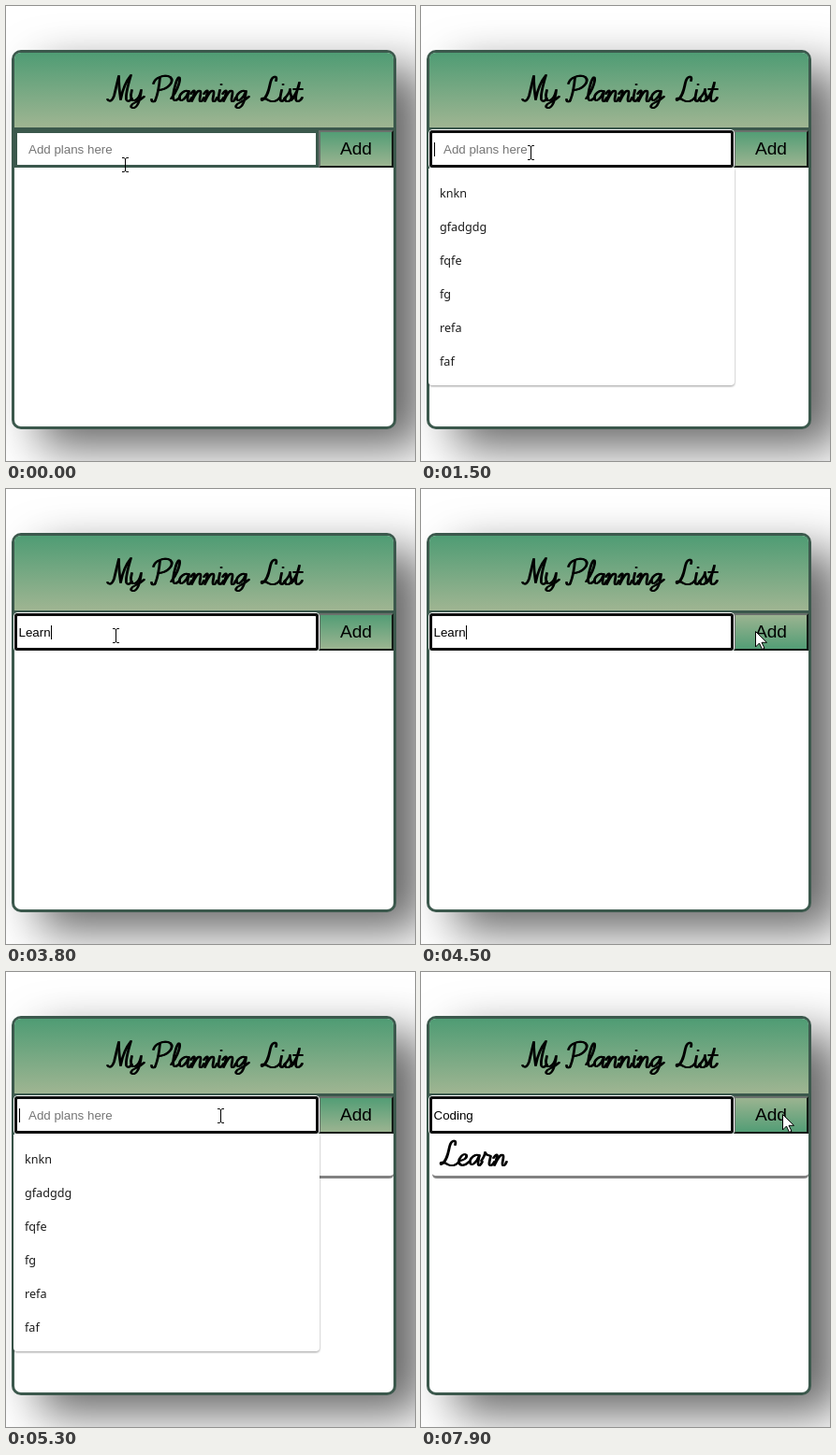
These frames come from a looping animation (437 by 487 pixels, 8 s). An HTML page:

```html
<!DOCTYPE html>
<html lang="en">
<head>
<meta charset="utf-8">
<title>Planning list</title>
<style>
html, body { margin: 0; width: 100%; height: 100%; overflow: hidden; background: #fff; }
.card {
  position: absolute; left: 6px; top: 47px; width: 411px; height: 406px;
  box-sizing: border-box; border: 3px solid #3b584c; border-radius: 10px;
  background: #fff; box-shadow: 30px 20px 50px rgba(0, 0, 0, .6);
}
svg { position: absolute; left: 0; top: 0; }
text { font: 13.333px "Liberation Sans", Arial, sans-serif; white-space: pre; }
#add { font-size: 19.2px; }
#menu text { font: 12.6px "Noto Sans", "Open Sans", sans-serif; fill: #1c1c1c; }
#menu > path { filter: drop-shadow(0 1px 1px rgba(0, 0, 0, .4)); }
.script { fill: none; stroke: #000; stroke-width: 1.8; stroke-linecap: round; stroke-linejoin: round; }
.ring { fill: none; stroke: #101010; }
.halo { fill: none; stroke: #fff; }
</style>
</head>
<body>
<div class="card"></div>
<svg width="437" height="487" viewBox="0 0 437 487">
  <defs>
    <linearGradient id="down" x2="0" y2="1">
      <stop stop-color="#4f9c74"/><stop offset="1" stop-color="#9fb592"/>
    </linearGradient>
    <linearGradient id="up" x2="0" y2="1">
      <stop stop-color="#9fb592"/><stop offset="1" stop-color="#4f9c74"/>
    </linearGradient>
  </defs>

  <path fill="url(#down)" d="M9 130V57q0-7 7-7H407q7 0 7 7V130z"/>
  <path fill="#3b584c" d="M9 130H414v3H9z"/>
  <g id="title" class="script" role="img" aria-label="My Planning List"></g>

  <g id="item">
    <g id="plan" class="script" role="img" aria-label="Learn"></g>
    <path fill="#828282" d="M12 216q1 2 5 2H409q4 0 5-2v1q0 4-5 4H17q-5 0-5-5z"/>
  </g>

  <rect x="10.5" y="134.5" width="322" height="37" fill="#fff" stroke="#3b584c" stroke-width="3"/>
  <rect id="button" x="334" y="133" width="80" height="40"/>
  <path fill="#6a706c" d="M334 173V133H414l-2 2H336V171z"/>
  <path fill="#141a16" d="M414 133V173H334l2-2H412V135z"/>
  <text id="add" x="356.9" y="159">Add</text>

  <g id="inputFocus">
    <rect class="halo" x="8.5" y="132.5" width="326" height="41" rx="3.5"/>
    <rect class="ring" x="10.5" y="134.5" width="322" height="37" rx="2" stroke-width="3"/>
  </g>
  <g id="buttonFocus">
    <rect class="halo" x="333.5" y="132.5" width="81" height="41" rx="3.5"/>
    <rect class="ring" x="335" y="134" width="78" height="38" rx="2" stroke-width="2"/>
  </g>

  <text id="hint" x="24" y="158" fill="#757575">Add plans here</text>
  <text id="typed" x="13.5" y="158"></text>
  <path id="caret" d="M0 146h1v15h-1z"/>

  <g id="menu">
    <path fill="#fff" d="M8 174H335V402q0 4-4 4H12q-4 0-4-4z"/>
  </g>

  <g id="pointer">
    <path id="beam" fill="none" stroke="#000" d="M-3-7.5H-1L.5-6.5 2-7.5H4M.5-6.5V6.5M-3 7.5H-1L.5 6.5 2 7.5H4"/>
    <path id="arrow" fill="#fff" stroke="#000" d="M.5.5V17l4-4 3 6.5 2.5-1.200-3-6h5.500z"/>
  </g>
</svg>
<script>
const $ = id => document.getElementById(id);

// Pen strokes of the script lettering: [advance, path], baseline at y = 0
const pen = {
  M: [25, "M0-2C2 1 5 0 7-6L12-27C12-18 13-9 14-2C16-12 20-22 25-28C22-18 19-8 20-2C21 1 24 0 26-3"],
  y: [14, "M1-12C-1-5 0 0 4-1C8-2 10-7 11-12C10-3 8 6 3 7C-2 7 0 3 5 1C9-1 12-3 14-5"],
  P: [21, "M9-25C8-15 6-6 4-1C3 1 0 1 0-2M2-19C4-26 14-29 20-26C25-21 17-12 7-12"],
  l: [8, "M0-3C5-9 10-20 9-25C7-29 3-14 2-6C2 1 5 0 9-4"],
  a: [13, "M11-10C7-14 0-7 1-3C2 2 8-3 11-11C9-3 9 0 11 0C12 0 13-2 14-4"],
  n: [14, "M0-8C2-11 4-13 4-10L1 0C4-7 8-13 10-11C12-9 8-2 10 0C12 1 13-2 14-4"],
  i: [6, "M3-12C2-6 0-1 3 0C5 0 6-2 7-4M4.5-18h.1"],
  g: [13, "M11-10C7-14 0-7 1-3C2 2 8-3 11-11C10-2 8 6 3 7C-2 7 0 3 5 1C9-1 12-3 14-5"],
  L: [25, "M22-22C24-28 18-28 16-20C14-10 12-3 7-1C5-4 10-4 14-1C18 1 22 1 26-4"],
  s: [9, "M0-3C3-6 6-10 6-13C5-8 10-4 6-1C4 1 0 0 1-2M7-1L10-4"],
  t: [10, "M0-4C4-9 6-14 7-20C4-10 1 0 5 0C7 0 9-2 10-4M1-13H10"],
  e: [12, "M1-5C6-5 10-8 9-11C6-14 1-8 1-4C2 2 8 0 12-4"],
  r: [13, "M0-5C2-8 4-11 4-14C5-10 8-11 10-10C9-5 7 0 10 0C11 0 13-2 14-4"],
  " ": [8, ""]
};

function letter(id, x, y) {
  const group = $(id);
  let out = "";
  for (const c of group.getAttribute("aria-label")) {
    const [advance, d] = pen[c];
    // Two passes side by side give the strokes a broad nib
    for (const nib of [0, 1]) out += `<path transform="translate(${x + nib} ${y})" d="${d}"/>`;
    x += advance;
  }
  group.innerHTML = out;
}
letter("title", 108, 102);
letter("plan", 14, 207);

["knkn", "gfadgdg", "fqfe", "fg", "refa", "faf"].forEach((word, i) => {
  $("menu").insertAdjacentHTML("beforeend", `<text x="20" y="${205 + 36 * i}">${word}</text>`);
});

const moves = [
  [0, 127, 170], [100, 127, 170], [300, 117, 157], [4100, 117, 157], [4500, 357, 152],
  [4900, 357, 152], [5100, 229, 154], [7600, 229, 154], [7900, 386, 152], [8000, 386, 152]
];
const typing = [
  [0, ""], [2500, "L"], [2700, "Le"], [2900, "Lea"], [3100, "Lear"], [3400, "Learn"], [4800, ""],
  [5800, "C"], [6300, "Co"], [6500, "Cod"], [6600, "Codin"], [6800, "Coding"]
];

const within = (t, ...spans) => spans.some(([a, b]) => t >= a && t < b);
const show = (id, on) => $(id).style.display = on ? "" : "none";

function pointerAt(t) {
  const k = moves.findIndex(m => m[0] > t);
  const [t0, x0, y0] = moves[k - 1], [t1, x1, y1] = moves[k];
  const p = (t - t0) / (t1 - t0);
  return [Math.round(x0 + (x1 - x0) * p), Math.round(y0 + (y1 - y0) * p)];
}

function draw(t) {
  const [x, y] = pointerAt(t);
  const hover = x >= 334;
  $("pointer").setAttribute("transform", `translate(${x} ${y})`);
  show("beam", !hover);
  show("arrow", hover);
  $("button").setAttribute("fill", hover ? "url(#up)" : "url(#down)");

  const value = typing.findLast(k => k[0] <= t)[1];
  $("typed").textContent = value;
  show("hint", !value);
  const end = value ? Math.round(13.5 + $("typed").getComputedTextLength()) : 14;
  $("caret").setAttribute("transform", `translate(${end} 0)`);
  show("caret", within(t, [500, 1000], [1500, 2100], [2500, 4000], [4500, 4700], [5200, 7400]));

  show("inputFocus", within(t, [500, 4700], [5200, 8000]));
  show("buttonFocus", within(t, [4700, 5200]));
  show("menu", within(t, [600, 2600], [5300, 5900]));
  show("item", t >= 4800);
}

function tick(now) {
  draw(Math.floor(now % 8000 / 100) * 100);
  requestAnimationFrame(tick);
}
draw(0);
requestAnimationFrame(tick);
</script>
</body>
</html>
```
